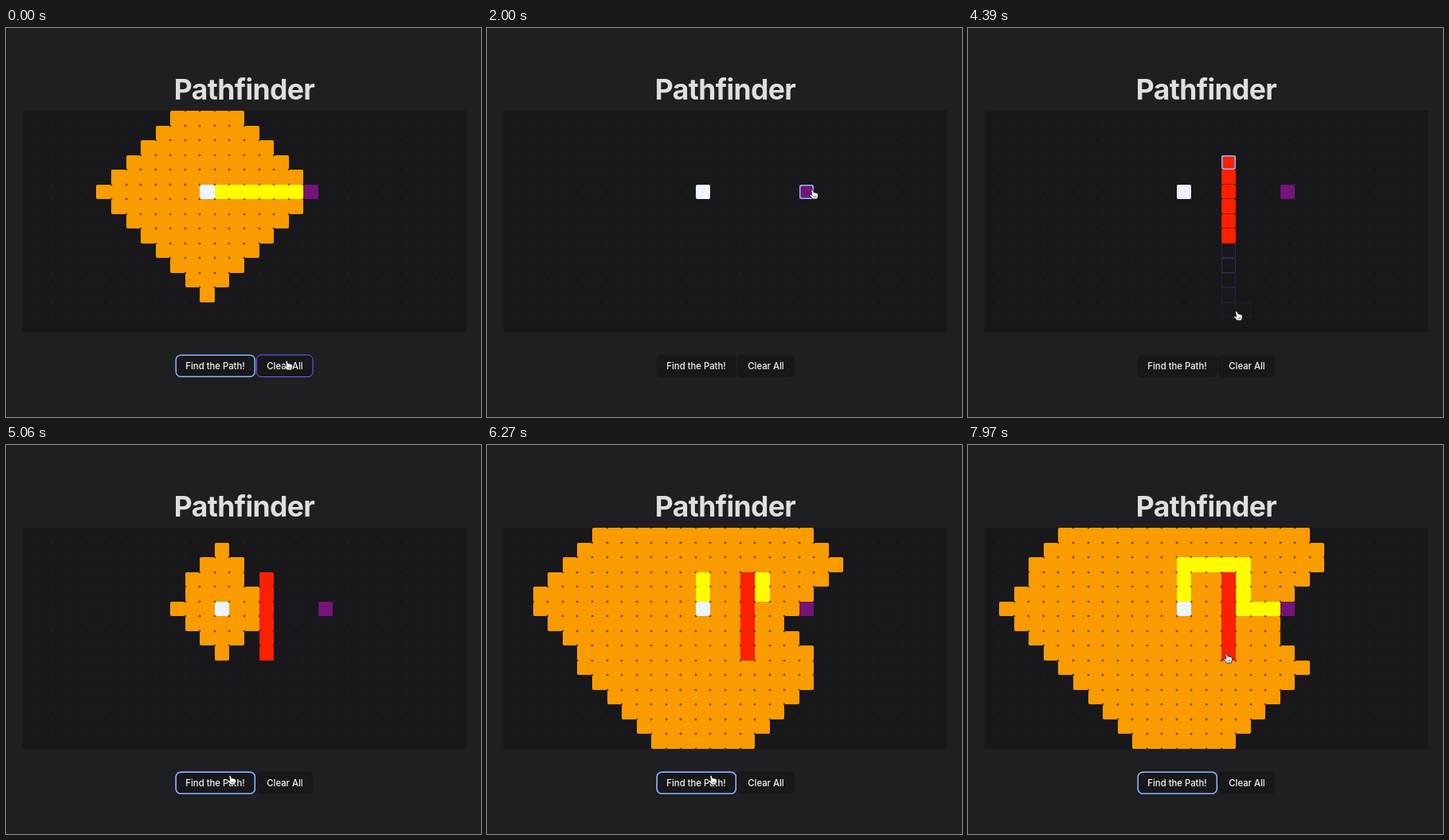
These frames come from a looping animation (596x489 px, 8000 ms). An HTML page with a canvas:

```html
<!DOCTYPE html>
<html lang="en">
<head>
<meta charset="utf-8">
<title>Pathfinder</title>
<style>
  html, body { margin: 0; width: 100%; height: 100%; overflow: hidden; background: #1f1e20; }
  #stage { position: relative; width: 596px; height: 489px; overflow: hidden; font-family: Inter, sans-serif; }
  #stage > * { position: absolute; margin: 0; white-space: nowrap; }
  canvas, svg { left: 0; top: 0; }
  h1 { left: 0; width: 598px; top: 56px; line-height: 44px; text-align: center;
       font-size: 35.5px; font-weight: 700; letter-spacing: -0.6px; color: #dfdfdf; }
  .label { top: 411px; line-height: 28px; text-align: center; font-size: 11.3px; font-weight: 500; color: #f4f4f4; }
  #find { left: 212px; width: 101px; }
  #clear { left: 314px; width: 72px; }
</style>
</head>
<body>
<div id="stage">
  <canvas id="board" width="596" height="489"></canvas>
  <h1>Pathfinder</h1>
  <div class="label" id="find">Find the Path!</div>
  <div class="label" id="clear">Clear All</div>
  <svg width="596" height="489">
    <g id="hand">
      <path d="M-1.2 1 Q0 -.6 1.2 1 L2 4 Q3.2 3.2 4 4.3 Q5.2 3.7 5.8 4.8 Q7 4.5 7.3 5.8 L7.4 8.6 L6.2 12 H.6 Q-1 9.6 -3 7.6 Q-3.4 6 -1.6 6.4 L-.2 7.4 Z"
            fill="#fff" stroke="#111" stroke-width=".8" stroke-linejoin="round"/>
      <path d="M1.9 8v2.4M3.5 8v2.4M5.1 8v2.4" stroke="#333" stroke-width=".6"/>
    </g>
  </svg>
</div>
<script>
const LOOP = 8000, COLS = 30, ROWS = 15, X0 = 20.7, Y0 = 104, W = 18.55, H = 18.53;
const FADE = 250, STEP = 5, RATE = 0.15875;
const T = { clear: 260, start: 1030, end: 1800, press: 2890, drag: 3030, find: 4870,
            search: 4890, trace: 6260, done: 6320 };
const color = { cell: '#18171a', dot: '#201f22', visited: '#fa9c00', path: '#fdfd00', wall: '#fa2000',
                start: '#eef5fe', end: '#75147a', ring: '#8abaff', hover: '100,108,255' };
const buttons = { find: [212.5, 410.5, 100.5, 28.5], clear: [314, 410.5, 71.5, 28.5] };

// Pointer tip: time, x, y
const track = [
  [0, 352, 418], [650, 352, 418], [1000, 275, 204], [1270, 275, 204], [1720, 408, 203],
  [2150, 408, 203], [2700, 335, 173], [3040, 335, 173], [3780, 330, 262], [4000, 330, 262],
  [4160, 331, 281], [4260, 332, 300], [4340, 334, 338], [4390, 337, 355.5], [4610, 297, 412],
  [4700, 281, 415], [7790, 281, 415], [7880, 284, 403], [7940, 324, 262], [8000, 324, 262]
];

const ctx = document.getElementById('board').getContext('2d');
const hand = document.getElementById('hand');
const key = (c, r) => c + ',' + r;

function pointer(t) {
  let i = 1;
  while (i < track.length - 1 && track[i][0] < t) i++;
  const [t0, x0, y0] = track[i - 1], [t1, x1, y1] = track[i];
  const k = Math.min(1, Math.max(0, (t - t0) / (t1 - t0)));
  return [x0 + (x1 - x0) * k, y0 + (y1 - y0) * k];
}

// Breadth-first search, neighbours in the order up, down, left, right
function search(start, end, walls) {
  const from = new Map([[key(...start), null]]), queue = [start], visited = [];
  const walled = new Set(walls.map(w => key(...w)));
  while (queue.length) {
    const [c, r] = queue.shift();
    for (const [dc, dr] of [[0, -1], [0, 1], [-1, 0], [1, 0]]) {
      const next = [c + dc, r + dr], id = key(...next);
      if (next[0] < 0 || next[0] >= COLS || next[1] < 0 || next[1] >= ROWS) continue;
      if (from.has(id) || walled.has(id)) continue;
      from.set(id, [c, r]);
      if (id === key(...end)) {
        const path = [];
        for (let p = [c, r]; from.get(key(...p)); p = from.get(key(...p))) path.unshift(p);
        return { visited, path };
      }
      visited.push(next);
      queue.push(next);
    }
  }
  return { visited, path: [] };
}

const walls = [3, 4, 5, 6, 7, 8].map(r => [16, r]);
const first = { start: [12, 5], end: [19, 5] };
const second = { start: [13, 5], end: [20, 5] };
Object.assign(first, search(first.start, first.end, []));
Object.assign(second, search(second.start, second.end, walls));

function box(c, r) {
  const x = Math.round(X0 + c * W), y = Math.round(Y0 + r * H);
  return [x, y, Math.round(X0 + (c + 1) * W) - x, Math.round(Y0 + (r + 1) * H) - y];
}

function round(b, radius, inset = 0) {
  ctx.beginPath();
  ctx.roundRect(b[0] + inset, b[1] + inset, b[2] - 2 * inset, b[3] - 2 * inset, radius);
}

function paint(cells, fill) {
  ctx.fillStyle = fill;
  for (const cell of cells) { round(box(...cell), 2); ctx.fill(); }
}

function outline(b, radius, stroke, width) {
  round(b, radius, width / 2);
  ctx.strokeStyle = stroke;
  ctx.lineWidth = width;
  ctx.stroke();
}

function target(x, y) {
  for (const id in buttons) {
    const [bx, by, bw, bh] = buttons[id];
    if (x >= bx && x < bx + bw && y >= by && y < by + bh) return id;
  }
  const c = Math.floor((x - X0) / W), r = Math.floor((y - Y0) / H);
  return c >= 0 && c < COLS && r >= 0 && r < ROWS ? key(c, r) : null;
}

const bounds = id => buttons[id] || box(...id.split(',').map(Number));

// Border fades: share of the last FADE ms spent over each element
function drawHover(t) {
  const share = {};
  for (let d = 0; d < FADE; d += STEP) {
    const id = target(...pointer(Math.max(0, t - d)));
    if (id) share[id] = (share[id] || 0) + STEP / FADE;
  }
  for (const id in share) outline(bounds(id), buttons[id] ? 6 : 2, `rgba(${color.hover},${share[id]})`, 1);
}

function focused(t) {
  if (t < T.clear || t >= T.find) return 'find';
  if (t < T.start) return 'clear';
  return t < T.end ? '13,5' : t < T.press ? '20,5' : '16,3';
}

function drawBoard() {
  ctx.clearRect(0, 0, 596, 489);
  ctx.fillStyle = color.cell;
  ctx.fillRect(20.7, 104, COLS * W, ROWS * H);
  ctx.fillStyle = color.dot;
  for (let c = 1; c < COLS; c++)
    for (let r = 1; r < ROWS; r++) ctx.fillRect(Math.round(X0 + c * W) - 1, Math.round(Y0 + r * H) - 1, 2, 2);
  ctx.fillStyle = color.cell;
  for (const id in buttons) { round(buttons[id], 6); ctx.fill(); }
}

function drawCells(t) {
  if (t < T.clear) {
    paint(first.visited, color.visited);
    paint(first.path, color.path);
    paint([first.start], color.start);
    paint([first.end], color.end);
    return;
  }
  paint(second.visited.slice(0, Math.max(0, Math.floor((t - T.search) * RATE))), color.visited);
  if (t >= T.trace) paint(second.path.filter(p => t >= T.done || p[1] === 3 || p[1] === 4), color.path);
  if (t >= T.drag) {
    const last = t > 3790 ? 8 : Math.floor((pointer(t)[1] - Y0) / H);
    const shown = walls.filter(w => w[1] <= last);
    paint(shown, color.wall);
    if (t < T.find) {
      ctx.fillStyle = 'rgba(40,0,0,.4)';
      for (const w of shown) { const b = box(...w); ctx.fillRect(b[0], b[1] + b[3] - 1, b[2], 1); }
    }
  }
  if (t >= T.start) paint([second.start], color.start);
  if (t >= T.end) paint([second.end], color.end);
}

function draw(t) {
  drawBoard();
  drawCells(t);
  drawHover(t);
  const id = focused(t);
  outline(bounds(id), buttons[id] ? 6 : 2.5, color.ring, 1.5);
  const [x, y] = pointer(t);
  hand.setAttribute('transform', `translate(${x} ${y})`);
}

const begin = performance.now();
function tick() {
  draw((performance.now() - begin) % LOOP);
  requestAnimationFrame(tick);
}
tick();
</script>
</body>
</html>
```
